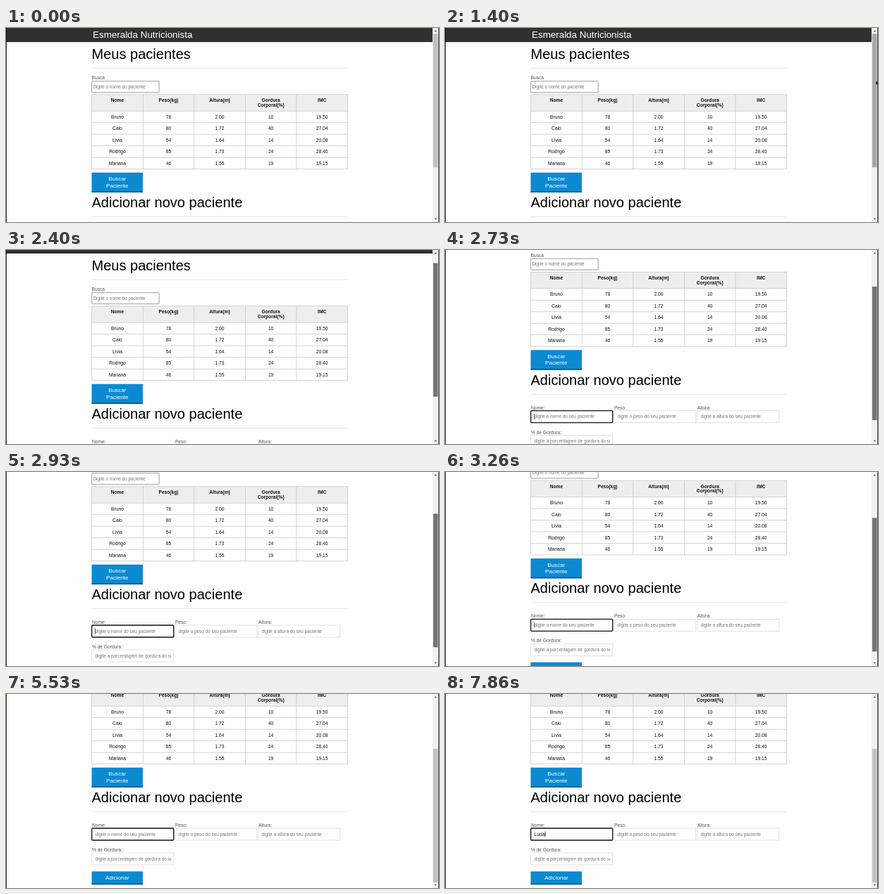
These frames come from a looping animation (614 by 276 pixels, 8 s). An HTML page:

```html
<!DOCTYPE html>
<html lang="pt-BR">
<head>
<meta charset="utf-8">
<title>Meus pacientes</title>
<style>
html, body { margin: 0; width: 614px; height: 276px; overflow: hidden; background: #fefefe; }
svg { display: block; }
text { font-family: "Liberation Sans", Arial, sans-serif; white-space: pre; }
</style>
</head>
<body>
<svg id="stage" width="614" height="276" viewBox="0 0 614 276"></svg>
<script>
const LOOP = 8000;
const stage = document.getElementById('stage');

function add(tag, attrs, parent = stage) {
  const node = document.createElementNS('http://www.w3.org/2000/svg', tag);
  for (const key in attrs) node.setAttribute(key, attrs[key]);
  return parent.appendChild(node);
}

const page = add('g', {});

function box(x, y, width, height, fill, attrs = {}, parent = page) {
  return add('rect', { x, y, width, height, fill, ...attrs }, parent);
}

function label(content, x, y, size, fill, attrs = {}) {
  const node = add('text', { x, y, 'font-size': size, fill, ...attrs }, page);
  node.textContent = content;
  return node;
}

const centered = { 'text-anchor': 'middle' };
const bold = { ...centered, 'font-weight': 'bold' };

function heading(content, baseline, ruleY) {
  label(content, 121.5, baseline, 20.05, '#000');
  box(121.5, ruleY, 363.5, 0.8, '#e2e2e2');
}

function button(lines, y, height) {
  box(121.5, y, 72.5, height, '#0b8ad2');
  box(121.5, y + height - 1.7, 72.5, 1.7, '#075a8a');
  lines.forEach((line, i) => label(line, 157.8, y + 11.6 + i * 9.2, 8.1, '#fff', centered));
}

function field(title, hint, x, y, focused) {
  label(title, x + 0.2, y - 2, 6.65, '#555');
  box(x, y, 116, 17, '#fff', focused
    ? { stroke: '#111', 'stroke-width': 1.3, rx: 1 }
    : { stroke: '#d6d6d6', 'stroke-width': 0.7 });
  const clip = add('clipPath', { id: 'clip' + x + '-' + y }, page);
  box(x + 4, y, 108.5, 17, '#000', {}, clip);
  return label(hint, x + 4.9, y + 10.5, 6.4, '#757575', { 'clip-path': `url(#${clip.id})` });
}

// Page header and patient list
box(0, 0, 605, 20, '#303030');
label('Esmeralda Nutricionista', 123, 14.4, 13.4, '#fff');
heading('Meus pacientes', 43.5, 56.7);
label('Busca', 121.6, 73.3, 6.65, '#555');
box(121.7, 75.7, 95.4, 16, '#fff', { stroke: '#858585', 'stroke-width': 0.8, rx: 0.6 });
label('Digite o nome do paciente', 123.4, 85.9, 6.4, '#757575');

const table = { x: 121.7, y: 94.8, head: 23.4, row: 16.5, col: 72.55 };
const titles = [['Nome'], ['Peso(kg)'], ['Altura(m)'], ['Gordura', 'Corporal(%)'], ['IMC']];
const patients = [
  ['Bruno', '78', '2.00', '10', '19.50'],
  ['Caio', '80', '1.72', '40', '27.04'],
  ['Lívia', '54', '1.64', '14', '20.08'],
  ['Rodrigo', '85', '1.73', '24', '28.40'],
  ['Mariana', '46', '1.55', '19', '19.15'],
];
const columnCenter = i => table.x + (i + 0.5) * table.col;
const tableWidth = 5 * table.col;
const tableHeight = table.head + 5 * table.row;

box(table.x, table.y, tableWidth, table.head, '#eee');
for (let i = 0; i <= 5; i++) {
  box(table.x + i * table.col - 0.35, table.y, 0.7, tableHeight, '#c4c4c4');
  box(table.x, table.y + table.head + i * table.row - 0.35, tableWidth, 0.7, '#c4c4c4');
}
box(table.x, table.y - 0.35, tableWidth, 0.7, '#c4c4c4');
titles.forEach((lines, i) => lines.forEach((line, n) =>
  label(line, columnCenter(i), 105.4 + n * 6.7, 6.65, '#111', bold)));
patients.forEach((patient, r) => patient.forEach((value, i) =>
  label(value, columnCenter(i), 128.8 + r * table.row, 6.7, '#111', centered)));
button(['Buscar', 'Paciente'], 205.7, 28.3);

// New patient form
heading('Adicionar novo paciente', 255, 268.2);
const HINT = 'digite o nome do seu paciente';
const nameText = field('Nome:', HINT, 121.7, 292, true);
field('Peso:', 'digite o peso do seu paciente', 239.7, 292);
field('Altura:', 'digite a altura do seu paciente', 357.7, 292);
field('% de Gordura:', 'digite a porcentagem de gordura do seu paciente', 121.7, 327);
button(['Adicionar'], 353.4, 18.8);
const caret = box(126.4, 296.3, 0.7, 8, '#000');

// Window edges and scrollbar
box(604.8, 0, 8.4, 276, '#f1f1f1', {}, stage);
const thumb = box(605.8, 0, 6.6, 190, '#c1c1c1', {}, stage);
add('path', { d: 'M607.4 5.2h3.6l-1.8-2zM607.4 270.8h3.6l-1.8 2z', fill: '#505050' });
box(0, 0, 0.9, 276, '#111', {}, stage);
box(613.2, 0, 0.8, 276, '#111', {}, stage);
const pointer = add('path', {
  d: 'M611 74.8v6.4l1.4-1.3 1 2.3.6-.3V77.4z', fill: '#111', stroke: '#fff', 'stroke-width': 0.3,
});

// Each track lists [start time, value]; values hold until the next entry.
const scrollTrack = [
  [0, 0], [2200, 3], [2260, 6], [2330, 10], [2400, 15], [2530, 38],
  [2730, 63.4], [2860, 69], [2930, 74], [3000, 78],
  [3200, 80], [3260, 82.7], [3330, 89], [3400, 96], [3460, 101],
];
const thumbTrack = [[0, '#c1c1c1'], [1260, '#a8a8a8'], [2000, '#747474'], [4060, '#a8a8a8'], [4260, '#c1c1c1']];
const typedTrack = [[0, ''], [6460, 'L'], [6660, 'Lú'], [6930, 'Lúc'], [7130, 'Lúci'], [7860, 'Lúcia']];
const caretTrack = [
  [0, 1], [3410, 0], [3930, 1], [4470, 0], [5000, 1], [5530, 0], [6060, 1], [7660, 0], [7860, 1],
];

function valueAt(track, t) {
  let value = track[0][1];
  for (const [start, next] of track) if (t >= start) value = next;
  return value;
}

function render(t) {
  const scroll = valueAt(scrollTrack, t);
  page.setAttribute('transform', `translate(0 ${-scroll})`);
  thumb.setAttribute('y', 8.3 + scroll * 0.69);
  thumb.setAttribute('fill', valueAt(thumbTrack, t));
  pointer.setAttribute('visibility', t >= 1260 && t < 2200 ? 'visible' : 'hidden');

  const typed = valueAt(typedTrack, t);
  nameText.textContent = typed || HINT;
  nameText.setAttribute('fill', typed ? '#000' : '#757575');
  caret.setAttribute('x', 126.4 + (typed ? nameText.getComputedTextLength() : 0));
  caret.setAttribute('visibility', valueAt(caretTrack, t) ? 'visible' : 'hidden');
}

const begin = performance.now();
function tick() {
  render((performance.now() - begin) % LOOP);
  requestAnimationFrame(tick);
}
tick();
</script>
</body>
</html>
```
